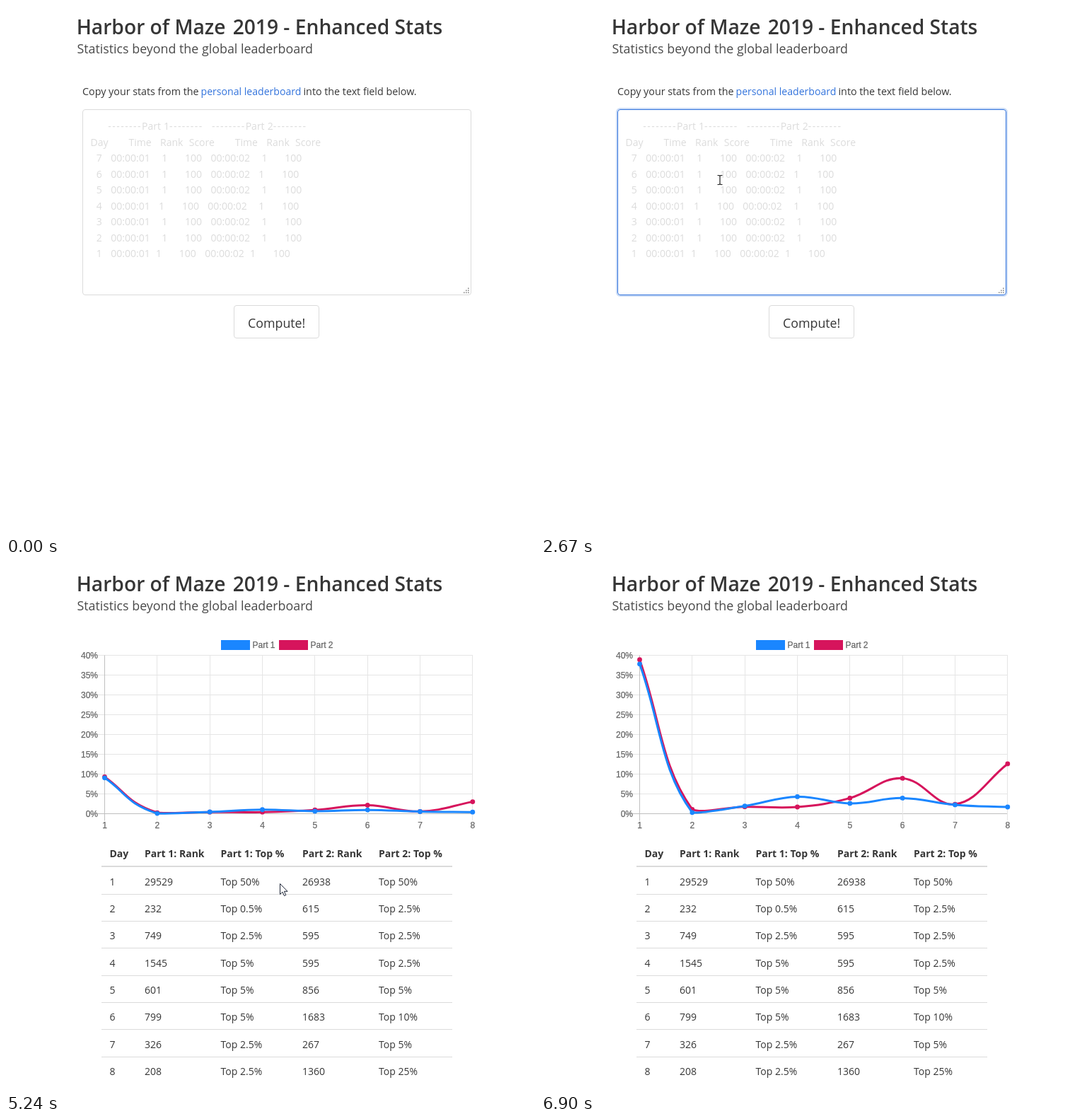
Animation, 748 px wide and 748 px high, one loop 9370 ms. Source, as an HTML page:

```html
<!DOCTYPE html>
<html lang="en">
<head>
<meta charset="utf-8">
<title>Enhanced Stats</title>
<style>
  html, body { margin: 0; width: 100%; height: 100%; overflow: hidden; background: #fff; }
  svg { display: block; width: 100vw; height: 100vh; }
  text { font: 14px 'Open Sans', 'Noto Sans', sans-serif; fill: #363636; white-space: pre; }
  .title { font-size: 28.2px; font-weight: 600; }
  .subtitle { font-size: 17.83px; fill: #4a4a4a; }
  .intro { font-size: 14.3px; }
  .link { font-size: 14.1px; fill: #3273dc; }
  .button { font-size: 17.75px; text-anchor: middle; }
  .row { word-spacing: .5px; }
  .dash { letter-spacing: 1.45px; }
  .hint text { fill: #dcdcdc; }
  .head { font-weight: 700; }
  .axis { font: 12px 'Liberation Sans', Arial, sans-serif; fill: #666; stroke: #666; stroke-width: .25; }
  .end { text-anchor: end; }
  .mid { text-anchor: middle; }
  .field { fill: none; stroke: #dbdbdb; }
  .field.hover { stroke: #b5b5b5; }
  .field.focus { stroke: #3273dc; }
  .ring { fill: none; stroke: #3273dc; stroke-width: 2; stroke-opacity: .25; }
</style>
</head>
<body>
<svg id="stage" viewBox="0 0 748 748"></svg>
<script>
const LOOP = 9370;
const PASTE = 3720, FOCUS = 1110, CLICK = 4780, RESULT = 5170, LEAVE = 6900;
const BLUE = '#1a86ff', PINK = '#d6145c';

const text = (x, y, s, cls = '') => `<text x="${x}" y="${y}" class="${cls}">${s}</text>`;
const rect = (x, y, w, h, extra) => `<rect x="${x}" y="${y}" width="${w}" height="${h}" ${extra}/>`;
const line = (x1, y1, x2, y2, color, w = 1) =>
  `<path d="M${x1} ${y1}L${x2} ${y2}" stroke="${color}" stroke-width="${w}"/>`;
const range = n => [...Array(n).keys()];

// Form
const dashes = '<tspan class="dash">--------</tspan>';
const heading = [
  `      ${dashes}Part 1${dashes}   ${dashes}Part 2${dashes}`,
  'Day       Time   Rank  Score       Time   Rank  Score'
];
const sample = [
  '  7   00:00:01    1      100   00:00:02    1      100',
  '  6   00:00:01    1      100   00:00:02   1      100',
  '  5   00:00:01    1      100   00:00:02    1      100',
  '  4   00:00:01   1      100   00:00:02    1      100',
  '  3   00:00:01    1      100   00:00:02    1      100',
  '  2   00:00:01    1      100   00:00:02    1      100',
  '  1   00:00:01  1      100   00:00:02  1      100'
];
// time, rank, top % for part 1, then for part 2
const days = [
  ['21:47:03', '29529', '50', '22:16:50', '26938', '50'],
  ['00:08:16', '232', '0.5', '00:19:48', '615', '2.5'],
  ['00:25:13', '749', '2.5', '00:32:01', '595', '2.5'],
  ['00:11:19', '1545', '5', '00:13:43', '595', '2.5'],
  ['00:29:53', '601', '5', '00:53:30', '856', '5'],
  ['00:16:05', '799', '5', '00:53:39', '1683', '10'],
  ['00:14:37', '326', '2.5', '00:44:19', '267', '5'],
  ['00:06:02', '208', '2.5', '00:38:00', '1360', '25']
];
const pad = s => ' '.repeat(7 - s.length) + s;
const pasted = days.map(([t1, r1, , t2, r2], i) =>
  `  ${i + 1}   ${t1}${pad(r1)}      0   ${t2}${pad(r2)}      0`).reverse();
const rows = list => list.map((s, i) => text(119.5, 175 + 22.5 * i, s, 'row')).join('');

const box = { x: 108.5, y: 146.5, w: 549, h: 262 };
const button = { x: 322.5, y: 423.5, w: 120, h: 46 };
const field = (id, b) =>
  rect(b.x - 1.5, b.y - 1.5, b.w + 3, b.h + 3, `rx="5" class="ring" id="${id}Ring"`) +
  rect(b.x, b.y, b.w, b.h, `rx="3.5" class="field" id="${id}"`);
const grip = range(3).map(r => range(r + 1).map(c =>
  rect(653 - 3 * c, 398.5 + 3 * r, 1.6, 1.6, 'fill="#8a8a8a"')).join('')).join('');

const form = text(108, 126, 'Copy your stats from the', 'intro') +
  text(275.5, 126, 'personal leaderboard', 'link') +
  text(420.5, 126, 'into the text field below.', 'intro') +
  field('box', box) + grip +
  `<g id="hint" class="hint">${rows([...heading, ...sample])}</g>` +
  `<g id="typed">${rows([...heading, ...pasted])}</g>` +
  rect(0, 0, 1, 20, 'id="caret" fill="#222"') +
  field('button', button) + text(382.7, 455.3, 'Compute!', 'button');

// Chart and table
const X0 = 139.5, DX = 74.33, Y0 = 354.5, UNIT = 5.6, TOP = 130.5;
const px = i => X0 + DX * i;
const series = [
  { id: 'part2', color: PINK, values: [38.9, 1.1, 1.75, 1.7, 3.95, 8.95, 2.4, 12.6] },
  { id: 'part1', color: BLUE, values: [37.8, .3, 1.95, 4.3, 2.6, 3.95, 2.25, 1.7] }
];

function controls(points) {
  const cap = y => Math.min(Y0, Math.max(TOP, y));
  return points.map((p, i) => {
    const a = points[i - 1] || p, b = points[i + 1] || p;
    const da = Math.hypot(p[0] - a[0], p[1] - a[1]);
    const db = Math.hypot(b[0] - p[0], b[1] - p[1]);
    const at = k => [p[0] + k * (b[0] - a[0]), cap(p[1] + k * (b[1] - a[1]))];
    return { before: at(-.4 * da / (da + db)), after: at(.4 * db / (da + db)) };
  });
}
for (const s of series) {
  s.points = s.values.map((v, i) => [px(i), Y0 - UNIT * v]);
  s.controls = controls(s.points);
}

const grid = range(9).map(i => {
  const y = Y0 - 28 * i;
  return line(130, y, px(7), y, i ? '#e5e5e5' : '#bfbfbf') +
    text(130, y + 4, 5 * i + '%', 'axis end');
}).join('') + range(8).map(i => {
  const x = Math.floor(px(i)) + .5;
  return line(x, TOP, x, 364.5, i ? '#e5e5e5' : '#bfbfbf') +
    text(px(i), 375, i + 1, 'axis mid');
}).join('');
const legend = (x, color, name) =>
  rect(x, 109, 41, 14, `fill="${color}"`) + text(x + 44.5, 119.5, name, 'axis');
const curves = series.map(s => `<path id="${s.id}" fill="none" stroke="${s.color}" stroke-width="3"/>` +
  `<g id="${s.id}Dots" fill="${s.color}">` +
  s.points.map(p => `<circle cx="${p[0]}" r="3.4"/>`).join('') + '</g>').join('');

const cols = [146.5, 196, 303.5, 419, 527];
const cells = (list, y, cls) => list.map((s, i) => text(cols[i], y, s, cls)).join('');
const table = cells(['Day', 'Part 1: Rank', 'Part 1: Top %', 'Part 2: Rank', 'Part 2: Top %'], 416, 'head') +
  line(135, 429, 631, 429, '#dbdbdb', 2) +
  days.map(([, r1, p1, , r2, p2], i) => {
    const y = 455.5 + 38.35 * i, rule = Math.floor(y + 12.6) + .5;
    return cells([i + 1, r1, `Top ${p1}%`, r2, `Top ${p2}%`], y) +
      (i < 7 ? line(135, rule, 631, rule, '#dbdbdb') : '');
  }).join('');

// Pointers, each with its hot spot at the origin
const pointers = `<g id="arrow"><path d="M.5 .5V15.5L4 12.2L6.5 17.6L8.8 16.6L6.4 11.3H11Z" fill="#fff" stroke="#1c2436"/></g>
<g id="beam"><path d="M-3.5-6.5h2.5l1 1 1-1h2.5M0-5.5v11M-3.5 6.5h2.5l1-1 1 1h2.5" fill="none" stroke="#222" stroke-width="1.2"/></g>
<g id="hand" stroke="#222" stroke-width="1.1"><path fill="#fff" d="M-1.7 13V1.7a1.7 1.7 0 0 1 3.4 0V7.5Q3.4 6.4 4.8 7.9Q6.7 6.9 7.8 8.8Q10.5 8.2 10.5 11V15Q10.5 18 8.5 21.5H.2Q-1.5 18-5 14.2Q-6.5 11.6-4.4 11.4Q-3 11.6-1.7 13Z"/><path fill="none" d="M1.7 7.5v4.5M4.8 8v4M7.8 9v3"/></g>`;

document.getElementById('stage').innerHTML =
  text(99.7, 40, 'Harbor of Maze', 'title') + text(320.7, 40, '2019 - Enhanced Stats', 'title') +
  text(100.5, 67.3, 'Statistics beyond the global leaderboard', 'subtitle') +
  `<g id="form">${form}</g>` +
  `<g id="result">${grid}${legend(304, BLUE, 'Part 1')}${legend(386, PINK, 'Part 2')}${curves}${table}</g>` +
  pointers;

const el = {};
document.querySelectorAll('[id]').forEach(n => el[n.id] = n);
const show = (id, on) => el[id].setAttribute('visibility', on ? 'inherit' : 'hidden');
const clamp = v => Math.min(1, Math.max(0, v));
const lerp = (a, b, k) => a + (b - a) * k;
// The screen refreshes in steps, so motion advances in steps too.
const snap = (t, start, step = 63.3) => step * Math.floor((t - start) / step + .1);
const inside = (p, b) => p && p[0] > b.x && p[0] < b.x + b.w && p[1] > b.y && p[1] < b.y + b.h;

function pointerAt(t) {
  if (t < 480 || t >= LEAVE) return null;
  if (t < 1357) {
    const left = 1 - clamp(snap(t, 480) / 760);
    return [lerp(256, 709, left ** 2.43), lerp(242, 735, left ** 1.478)];
  }
  if (t < 3977) {
    const k = clamp(snap(t, 1357) / 253);
    return [lerp(256, 253, k), lerp(242, 246, k)];
  }
  if (t < 6690) {
    const p = clamp(snap(t, 3977) / 633), k = p * p * (3 - 2 * p);
    return [lerp(253, 386.5, k), lerp(246, 453, k)];
  }
  const k = (snap(t, 6690, 70) / 140) ** 1.4;
  return [386.5 + 303 * k, 453 + 109 * k];
}

function caretOn(t) {
  if (t < FOCUS || t >= CLICK) return false;
  if (t >= PASTE) return (t - PASTE) % 1000 < 500;
  return t < 1610 || (t >= 2170 && t < 2670) || t >= 3230;
}

function setField(id, focus, hover) {
  el[id].setAttribute('class', 'field' + (focus ? ' focus' : hover ? ' hover' : ''));
  show(id + 'Ring', focus);
}

function drawForm(t, pos) {
  const done = t >= PASTE;
  show('hint', !done);
  show('typed', done);
  show('caret', caretOn(t));
  el.caret.setAttribute('transform', done ? 'translate(433 361)' : 'translate(120 159)');
  setField('box', t >= FOCUS && t < CLICK, inside(pos, box));
  setField('button', t >= CLICK, inside(pointerAt(t - 63), button));
}

function drawChart(t) {
  const p = clamp((RESULT + snap(t, RESULT, 65.7) - 5166) / 1055);
  const grow = 1 - (1 - p) ** 4;
  const y = v => Y0 + (v - Y0) * grow;
  const at = q => q[0].toFixed(2) + ' ' + y(q[1]).toFixed(2);
  for (const s of series) {
    const d = s.points.map((q, i) => i
      ? `C${at(s.controls[i - 1].after)} ${at(s.controls[i].before)} ${at(q)}`
      : 'M' + at(q));
    el[s.id].setAttribute('d', d.join(''));
    [...el[s.id + 'Dots'].children].forEach((c, i) => c.setAttribute('cy', y(s.points[i][1])));
  }
}

function drawPointer(t, pos) {
  const kind = !pos ? '' : t >= RESULT ? 'arrow'
    : inside(pos, box) ? 'beam' : inside(pos, button) ? 'hand' : 'arrow';
  for (const id of ['arrow', 'beam', 'hand']) {
    show(id, id === kind);
    if (id === kind) el[id].setAttribute('transform', `translate(${pos.map(Math.round).join(' ')})`);
  }
}

function draw(t) {
  const pos = pointerAt(t), result = t >= RESULT;
  el.form.style.display = result ? 'none' : '';
  el.result.style.display = result ? '' : 'none';
  if (result) drawChart(t); else drawForm(t, pos);
  drawPointer(t, pos);
}

let begin;
function tick(now) {
  begin ??= now;
  draw((now - begin) % LOOP);
  requestAnimationFrame(tick);
}
draw(0);
requestAnimationFrame(tick);
</script>
</body>
</html>
```
